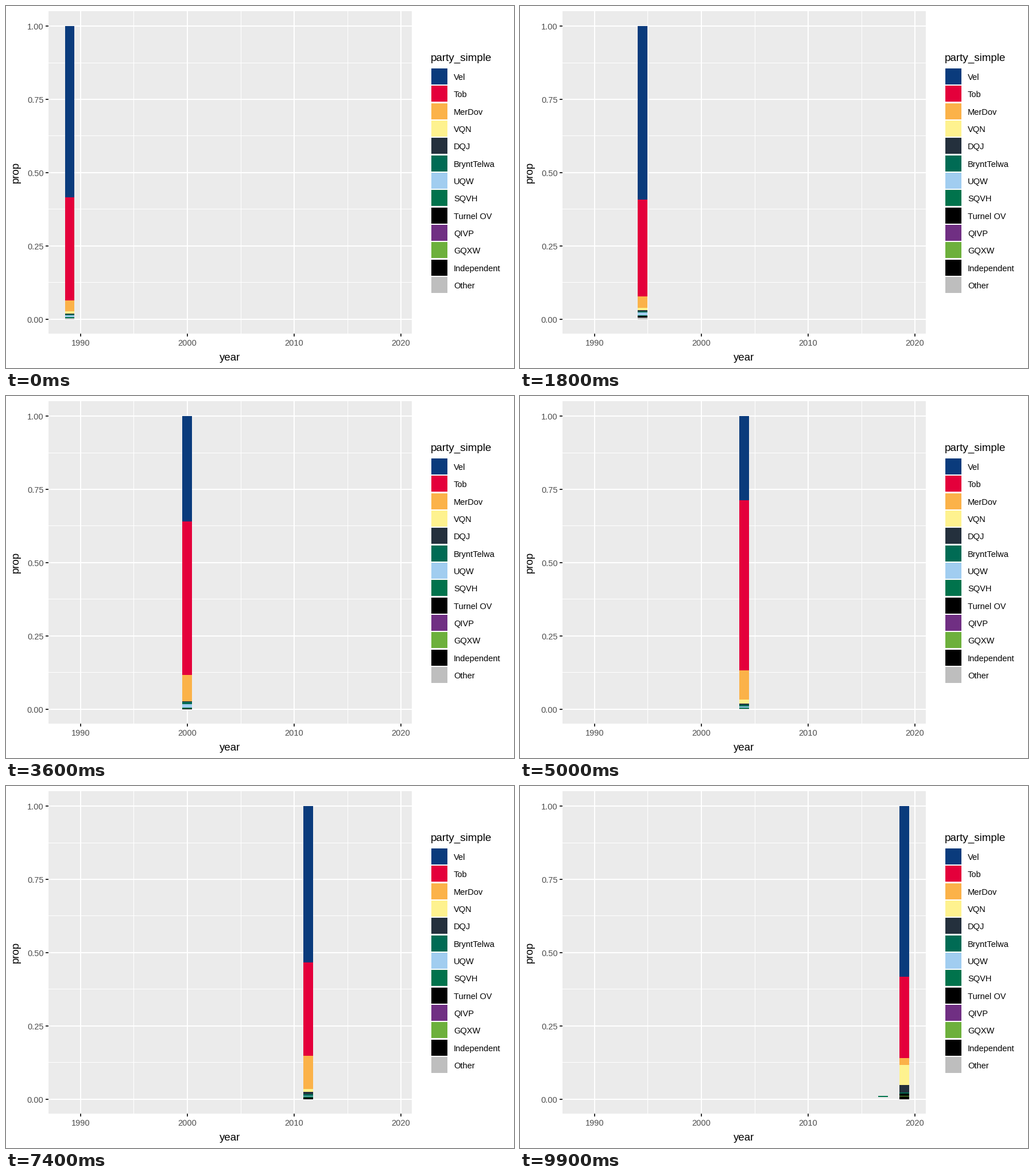
Animation, 885 px wide and 632 px high, one loop 10 s. Source, as a matplotlib script:

```python
import numpy as np
import matplotlib.pyplot as plt
from matplotlib.animation import FuncAnimation
from matplotlib.patches import Rectangle

W, H, DPI = 885, 632, 100
FRAMES, INTERVAL = 100, 100
LEFT, RIGHT, TOP, BOTTOM = 74, 707, 9, 572
BASE, UNIT = 546.6, 511.5
YEAR_PX, YEAR_0 = 18.62, 1987.005

PARTIES = [
    ("Vel", "#0A3B7C"), ("Tob", "#E4003B"), ("MerDov", "#FBB249"),
    ("VQN", "#FEF28F"), ("DQJ", "#24303D"), ("BryntTelwa", "#006B54"),
    ("UQW", "#A1CDF0"), ("SQVH", "#00734C"), ("Turnel OV", "#000000"),
    ("QIVP", "#702F83"), ("GQXW", "#6DB03C"), ("Independent", "#000000"),
    ("Other", "#BEBEBE"),
]

# year, then the upper edges in pixels of parties 1 to 4
LARGE = np.array([
    [1989, 213, 32.5, 14, 10],
    [1994.5, 209, 39.5, 19.5, 15.5],
    [1996, 212, 41, 19, 15],
    [1997, 285, 50, 17, 14],
    [1998, 325, 58, 16, 13.5],
    [2000, 328, 59.5, 14, 13.5],
    [2004, 365, 68, 16.5, 10],
    [2008.33, 349.5, 71.5, 15.5, 9.5],
    [2009, 345, 72, 16, 10],
    [2010, 275, 74, 16, 10.5],
    [2011, 240, 76, 17, 12],
    [2014, 230, 74, 22, 17],
    [2015, 227, 70, 56, 22],
    [2019, 214, 71.5, 59.5, 24.5],
])
# the same for parties 5 to 7 and 9 to 12
SMALL = np.array([
    [1989, 8.3, 6.5, 3.2, 1.6, 1.6, 1.6, 1.2],
    [1994.5, 14, 11.3, 6.5, 5.3, 5.3, 5.3, 2.5],
    [2000, 12.5, 8.6, 2.3, 0.4, 0.4, 0.4, 0],
    [2004, 8, 4.3, 2.2, 1, 1, 1, 0.9],
    [2008.33, 7, 4, 3.6, 2.6, 2.6, 2.6, 0],
    [2014.5, 10.7, 7.8, 6.6, 4.6, 3.2, 2.4, 0],
    [2017, 11, 5.2, 5.2, 3.2, 3.2, 2.2, 0],
    [2019, 11.3, 9.2, 9.2, 5.6, 5.6, 4.2, 0],
])
# first and last year of parties that come or go
ACTIVE = {6: (1989, 2017), 7: (1989, 2017), 8: (2019, 2019),
          9: (2014, 2016), 10: (2010, 2019)}
STUB = 7

YEARS = np.arange(1989, 2020)
KEYS = np.round((FRAMES - 1) * (YEARS - 1989) / 30)


def x_at(year):
    return LEFT + (year - YEAR_0) * YEAR_PX


def edges(year):
    """Upper edge of every party's band, top to bottom, ending at zero."""
    def track(table):
        return [np.interp(year, table[:, 0], col) for col in table[:, 1:].T]

    small = track(SMALL)
    tops = [UNIT] + track(LARGE) + small[:3] + [9.2] + small[3:] + [0]
    for k in range(len(PARTIES) - 1, -1, -1):
        first, last = ACTIVE.get(k, (1989, 2019))
        if not first <= year <= last:
            tops[k] = tops[k + 1]
    return tops


fig = plt.figure(figsize=(W / DPI, H / DPI), dpi=DPI, facecolor="white")
ax = fig.add_axes([0, 0, 1, 1])
ax.set_xlim(0, W)
ax.set_ylim(H, 0)
ax.axis("off")


def box(x0, y0, x1, y1, color, z=1):
    return ax.add_patch(Rectangle((x0, y0), x1 - x0, y1 - y0, facecolor=color,
                                  linewidth=0, antialiased=False, zorder=z))


def write(x, y, text, size=14.67, color="black", **kw):
    ax.text(x, y, text, fontsize=size * 72 / DPI, color=color,
            family="Liberation Sans", **kw)


def place(patch, year, high, low):
    x0, x1 = (round(x_at(year + d) - 0.2) for d in (-0.45, 0.45))
    y0, y1 = round(BASE - high), round(BASE - low)
    patch.set_bounds(x0, y0, x1 - x0, y1 - y0)
    patch.set_visible(y1 > y0)


# panel, grid and axes
box(LEFT, TOP, RIGHT, BOTTOM, "#EBEBEB")
for year in (1995, 2005, 2015):
    x = int(x_at(year))
    box(x, TOP, x + 1, BOTTOM, "white", 2)
for k in range(4):
    y = int(BASE - UNIT * (k + 0.5) / 4)
    box(LEFT, y, RIGHT, y + 1, "white", 2)
for year in (1990, 2000, 2010, 2020):
    x = round(x_at(year))
    box(x - 1, TOP, x + 1, BOTTOM, "white", 2)
    box(x - 1, BOTTOM, x + 1, BOTTOM + 5, "#333333")
    write(x, 593, str(year), color="#4D4D4D", ha="center")
for k in range(5):
    y = round(BASE - UNIT * k / 4)
    box(LEFT, y - 1, RIGHT, y + 1, "white", 2)
    box(LEFT - 5, y - 1, LEFT, y + 1, "#333333")
    write(65.5, y + 6, f"{k / 4:.2f}", color="#4D4D4D", ha="right")
write(390, 619, "year", 18.7, ha="center")
write(26, 290, "prop", 18.7, rotation=90, ha="right", va="center")

# legend
write(740, 96, "party_simple", 18.9)
for k, (name, color) in enumerate(PARTIES):
    mid = 123 + 30.33 * k
    box(741, round(mid - 14), 769, round(mid + 14), color)
    write(780, mid + 6, name)

bars = [box(0, 0, 0, 0, color, 4) for _, color in PARTIES]
stub = box(0, 0, 0, 0, PARTIES[STUB][1], 3)


def update(i):
    year = np.interp(i, KEYS, YEARS)
    tops = edges(year)
    for bar, high, low in zip(bars, tops, tops[1:]):
        place(bar, year, high, low)
    # this band stays behind at its last year
    place(stub, 2017, 5.2, 3.2)
    stub.set_visible(year > 2017)
    return bars + [stub]


anim = FuncAnimation(fig, update, frames=FRAMES, interval=INTERVAL,
                     repeat=True, repeat_delay=0)
plt.show()
```
